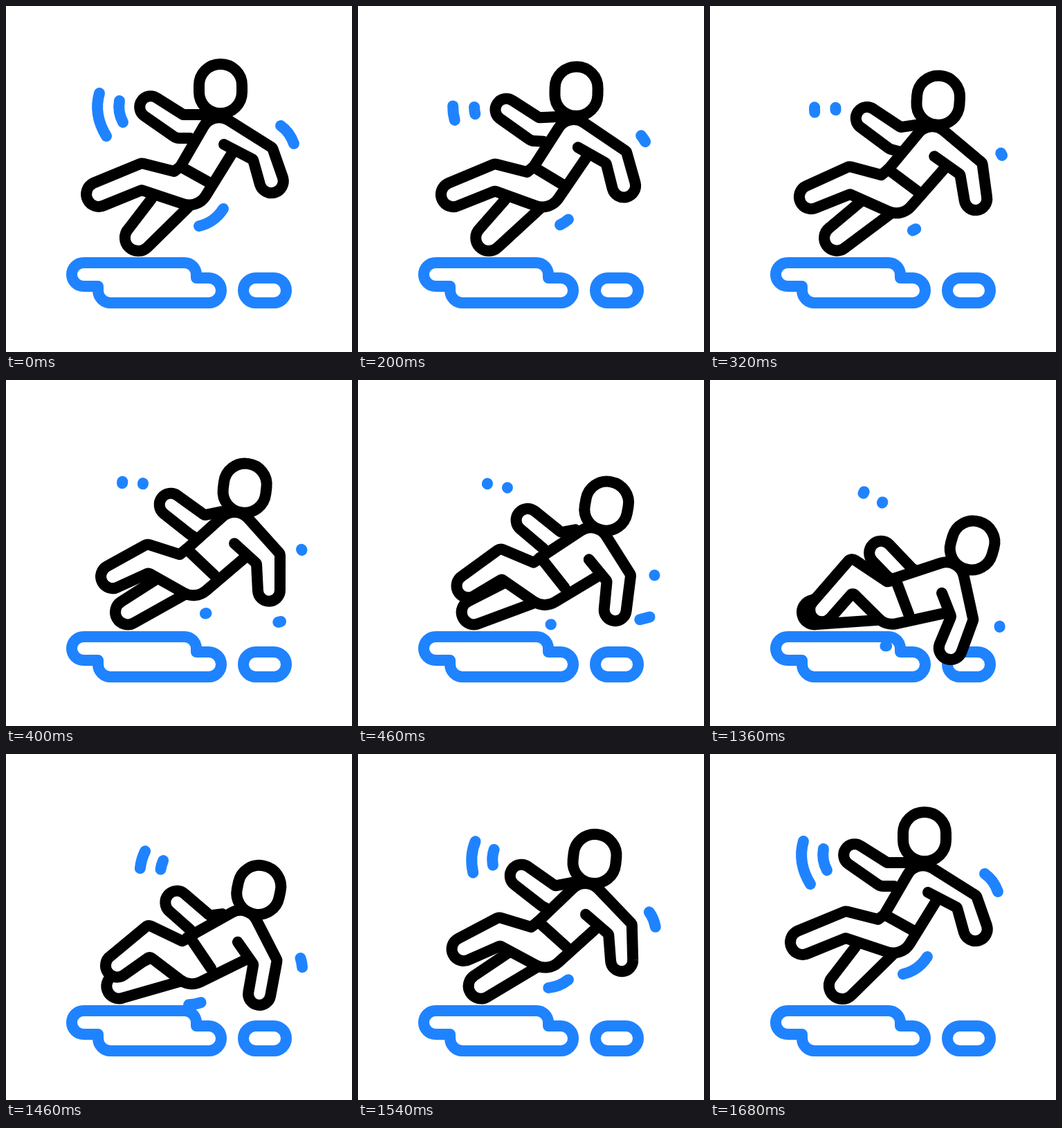
Animation of 500x500 px, one loop 1840 ms. Source, as an HTML page with a canvas:

```html
<!DOCTYPE html>
<html lang="en">
<head>
<meta charset="utf-8">
<title>Slip and fall</title>
<style>
  html, body { margin: 0; width: 100%; height: 100%; overflow: hidden; background: #fff; }
  canvas { display: block; width: 100vw; height: 100vh; }
</style>
</head>
<body>
<canvas id="stage" width="500" height="500"></canvas>
<script>
const ctx = document.getElementById('stage').getContext('2d');
const BLUE = '#1f83ff', LOOP = 1840, MID = 0.43, CAP = -1;

// Each row: corner radius (or CAP: half circle to the next point),
// then x, y while upright, halfway and lying down.
const backArm = [
  [0, 266, 191, 274, 228, 262, 289],
  [14, 246, 191, 266, 223, 255, 284],
  [CAP, 200, 159, 228, 193, 235, 263],
  [0, 218, 133, 248, 167, 259, 239],
  [4, 256, 157, 287, 195, 292, 274],
  [0, 284, 157, 312, 190, 300, 278]
];
const backLeg = [
  [0, 264, 290, 260, 309, 250, 347],
  [CAP, 205, 348, 185, 351, 154, 353],
  [0, 177, 322, 167, 320, 147, 318],
  [0, 210, 279, 217, 288, 195, 300]
];
const frontLeg = [
  [0, 329, 209, 347, 255, 340, 338],
  [28, 277, 293, 274, 317, 254, 356],
  [4, 196, 266, 206, 279, 206, 308],
  [CAP, 142, 288, 162, 299, 174, 345],
  [0, 126, 256, 146, 269, 149, 321],
  [8, 196, 227, 204, 237, 204, 257],
  [0, 243, 239, 251, 252, 256, 292],
  [0, 252, 232, 260, 245, 268, 290]
];
const torsoArm = [
  [0, 252, 232, 260, 245, 262, 289],
  [26, 299, 151, 332, 180, 361, 257],
  [4, 385, 205, 396, 251, 380, 348],
  [CAP, 400, 248, 396, 303, 363, 394],
  [0, 367, 258, 364, 304, 331, 383],
  [4, 357, 222, 362, 265, 348, 343],
  [0, 315, 200, 330, 236, 335, 309]
];
const belt = [
  [0, 252, 232, 261, 244, 269, 291],
  [0, 297, 257, 301, 282, 287, 340]
];
const headSpot = [0, 310, 119.5, 345, 156, 379.5, 240.5];

// Speed lines: quadratic curve while upright, and path of its centre.
const marks = [
  { curve: [[135, 126], [126, 157], [145, 188]], spot: [0, 133, 157, 168, 148, 223, 163] },
  { curve: [[164, 137], [161, 153], [169, 168]], spot: [0, 164, 153, 198, 150, 250, 178] },
  { curve: [[397, 173], [410, 182], [416, 199]], spot: [0, 408, 184, 427, 245, 418, 358] },
  { curve: [[314, 293], [301, 313], [279, 318]], spot: [0, 299, 309, 289, 337, 254, 385] }
];

const puddle = new Path2D(
  'M112 371H258A17 17 0 0 1 275 388V393H293A18 18 0 0 1 293 429' +
  'H151A18 18 0 0 1 133 411V405H112A17 17 0 0 1 112 371Z' +
  'M361 393H387A18 18 0 0 1 387 429H361A18 18 0 0 1 361 393Z');

const easeInOut = p => (1 - Math.cos(Math.PI * p)) / 2;

// fall: 0 upright to 1 lying; trim: visible share of the speed lines
function stateAt(t) {
  if (t < 20 || t >= 1680) return { fall: 0, trim: 1 };
  if (t < 540) {
    const p = t / 540;
    return { fall: p ** 2.8, trim: (1 - p) ** 2.4 };
  }
  if (t < 1360) return { fall: 1, trim: 0 };
  const back = easeInOut((t - 1340) / 350);
  return { fall: 1 - back, trim: back ** 0.66 };
}

// Parabola through the three poses
function pose(row, u) {
  const a = (u - MID) * (u - 1) / MID;
  const b = u * (u - 1) / (MID * (MID - 1));
  const c = u * (u - MID) / (1 - MID);
  return [row[1] * a + row[3] * b + row[5] * c, row[2] * a + row[4] * b + row[6] * c];
}

function limb(rows, u, filled) {
  const pts = rows.map(row => pose(row, u));
  ctx.beginPath();
  ctx.moveTo(...pts[0]);
  for (let i = 1; i < pts.length; i++) {
    const [x, y] = pts[i], radius = rows[i][0];
    if (radius === CAP) {
      const [nx, ny] = pts[++i];
      const angle = Math.atan2(y - ny, x - nx);
      ctx.arc((x + nx) / 2, (y + ny) / 2, Math.hypot(x - nx, y - ny) / 2, angle, angle + Math.PI);
    } else if (radius) {
      ctx.arcTo(x, y, ...pts[i + 1], radius);
    } else {
      ctx.lineTo(x, y);
    }
  }
  if (filled) ctx.fill();
  ctx.stroke();
}

function head(u) {
  const [x, y] = pose(headSpot, u);
  ctx.save();
  ctx.translate(x, y);
  ctx.rotate(u * 0.28);
  ctx.beginPath();
  ctx.roundRect(-31, -35.5, 62, 71, 30.5);
  ctx.stroke();
  ctx.restore();
}

// Point of the quadratic's polar form, used to cut out a part of the curve
function blossom([a, c, b], s, t) {
  return [0, 1].map(k =>
    a[k] * (1 - s) * (1 - t) + c[k] * (s + t - 2 * s * t) + b[k] * s * t);
}

function mark({ curve, spot }, u, trim) {
  const from = 0.5 - trim / 2, to = 0.5 + trim / 2;
  const [x, y] = pose(spot, u);
  ctx.save();
  ctx.translate(x, y);
  ctx.rotate(u * 0.6);
  ctx.translate(-spot[1], -spot[2]);
  ctx.beginPath();
  ctx.moveTo(...blossom(curve, from, from));
  ctx.quadraticCurveTo(...blossom(curve, from, to), ...blossom(curve, to, to));
  ctx.stroke();
  ctx.restore();
}

// Short dash that shoots away from the hand just before landing
function splash(t) {
  if (t < 390 || t >= 530) return;
  const p = (t - 390) / 140;
  const at = s => [393 + 57 * s, 350 - 15 * s];
  ctx.beginPath();
  ctx.moveTo(...at(p * p));
  ctx.lineTo(...at(p));
  ctx.stroke();
}

function draw(t) {
  const { fall, trim } = stateAt(t);
  ctx.fillStyle = '#fff';
  ctx.fillRect(0, 0, 500, 500);
  ctx.lineWidth = 16;
  ctx.lineCap = ctx.lineJoin = 'round';

  ctx.strokeStyle = BLUE;
  ctx.stroke(puddle);
  if (trim > 0) marks.forEach(m => mark(m, fall, trim));
  splash(t);

  ctx.strokeStyle = '#000';
  limb(backArm, fall);
  limb(backLeg, fall);
  limb(frontLeg, fall, true);
  limb(torsoArm, fall, true);
  limb(belt, fall);
  head(fall);
}

const start = performance.now();
function tick() {
  const t = (performance.now() - start) % LOOP;
  draw(Math.floor(t / 20) * 20);
  requestAnimationFrame(tick);
}
tick();
</script>
</body>
</html>
```
